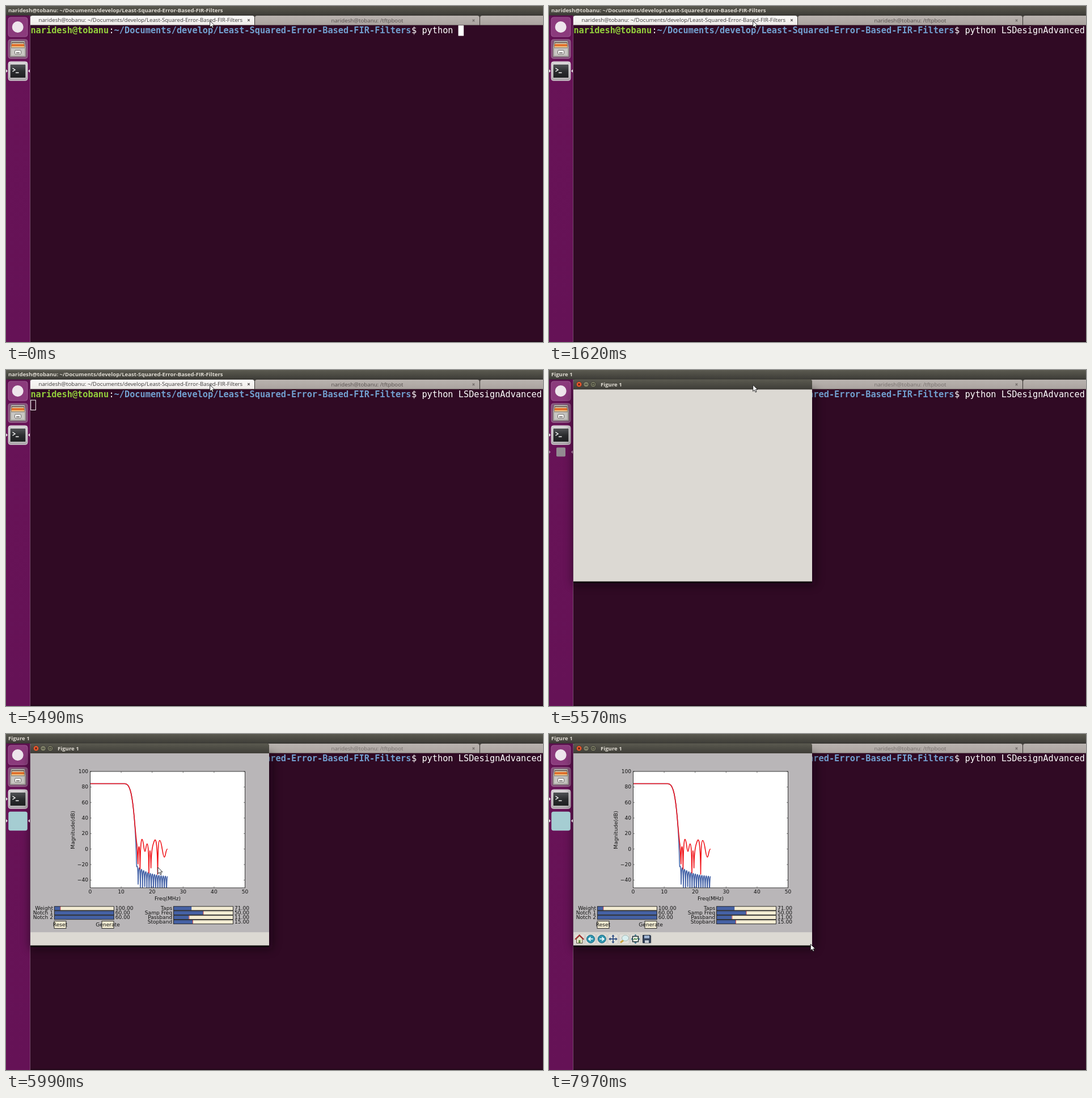
An HTML page that plays this animation: 947x592 px, repeating every 8 s.

```html
<!DOCTYPE html>
<html lang="en">
<head>
<meta charset="utf-8">
<title>Terminal and filter plot</title>
<style>
html, body { margin: 0; width: 100%; height: 100%; overflow: hidden; background: #300a24; }
svg { display: block; width: 947px; height: 592px; }
text { white-space: pre; }
.ui { font: 9.72px "Open Sans", "Noto Sans", sans-serif; }
.bold { font-weight: 700; font-size: 9.6px; fill: #dfdbd2; }
.mono { font: 15.28px "DejaVu Sans Mono", monospace; fill: #fff; }
.plot { font: 9.1px "DejaVu Sans", sans-serif; fill: #111; }
.mid { text-anchor: middle; }
.end { text-anchor: end; }
</style>
</head>
<body>
<svg id="stage" viewBox="0 0 947 592">
  <defs>
    <linearGradient id="bar" x2="0" y2="1"><stop stop-color="#5b5a50"/><stop offset="1" stop-color="#3d3c37"/></linearGradient>
    <linearGradient id="dock" x2="0" y2="1"><stop stop-color="#5c104e"/><stop offset=".12" stop-color="#681357"/><stop offset="1" stop-color="#651256"/></linearGradient>
    <linearGradient id="tabOn" x2="0" y2="1"><stop stop-color="#fbfaf9"/><stop offset="1" stop-color="#eeebe8"/></linearGradient>
    <linearGradient id="tabOff" x2="0" y2="1"><stop stop-color="#b9b3af"/><stop offset="1" stop-color="#aaa39f"/></linearGradient>
    <linearGradient id="tile" x2="0" y2="1"><stop stop-color="#d6d2d5"/><stop offset="1" stop-color="#a9a3a8"/></linearGradient>
    <linearGradient id="screen" x2="0" y2="1"><stop stop-color="#55575a"/><stop offset=".5" stop-color="#2c2e30"/><stop offset="1" stop-color="#1c1d1f"/></linearGradient>
    <filter id="blur" x="-20%" y="-20%" width="140%" height="140%"><feGaussianBlur stdDeviation="8"/></filter>
    <clipPath id="axesClip"><rect x="148.5" y="66" width="273" height="205"/></clipPath>
    <clipPath id="belowBar"><rect y="17" width="947" height="575"/></clipPath>
  </defs>

  <rect width="947" height="592" fill="#300a24"/>
  <rect y="590" width="947" height="2" fill="#220719"/>

  <g id="tabs" class="ui">
    <rect x="43" y="16" width="904" height="17.7" fill="#4a4742"/>
    <path d="M439 33.5V21Q439 17 443 17H831Q835 17 835 21V33.5Z" fill="url(#tabOff)"/>
    <path d="M836 33.5V21Q836 17 840 17H947V33.5Z" fill="url(#tabOff)"/>
    <path d="M43 33.5V20Q43 17 47 17H434Q438 17 438 21V33.5Z" fill="url(#tabOn)"/>
    <path d="M438.5 21V33.5M835.5 19V33.5" stroke="#35302e"/>
    <text id="tabText" x="57.5" y="28.3" fill="#3c3a3a"></text>
    <text id="tabText2" class="mid" x="637" y="28.6"></text>
    <path d="M426.2 23.2l3.6 3.6m0-3.6l-3.6 3.6" stroke="#4a4646" stroke-width="1.1"/>
    <path d="M822.7 23.7l3.6 3.6m0-3.6l-3.6 3.6" stroke="#6b6562" stroke-width="1.1"/>
  </g>

  <g id="prompt" class="mono"></g>
  <rect id="caret"/>

  <g id="dockBar">
    <rect y="16" width="42" height="576" fill="url(#dock)"/>
    <path d="M42.5 16V592" stroke="#76486c"/>
    <rect x="4" y="20" width="34" height="34" rx="4" fill="#8b3a7c" stroke="#a2659a" stroke-width=".8"/>
    <circle cx="20.7" cy="37" r="10" fill="#eee5ec"/>
    <rect x="4" y="59" width="34" height="33.5" rx="4" fill="#85507b" stroke="#a27b9b" stroke-width=".8"/>
    <path d="M9 61.5H33L35 73V88Q35 89.5 33.5 89.5H8.5Q7 89.5 7 88V73Z" fill="#b4b1ad" stroke="#6d6766" stroke-width=".7"/>
    <path d="M10 64H32L33 73.5H9Z" fill="#5a4438"/>
    <path d="M10.5 65.5H31.5V69H10.5Z" fill="#efe3c4"/>
    <path d="M10 67H32V71H10Z" fill="#e0702c"/>
    <path d="M9.5 71H32.5V73H9.5Z" fill="#f0c98a"/>
    <rect x="8.5" y="74" width="25" height="14" rx="1" fill="#c8c6c2" stroke="#8a8683" stroke-width=".6"/>
    <rect x="15.5" y="78" width="11" height="7" rx="1.5" fill="#f4f3f1" stroke="#6c6867"/>
    <path d="M18 82.5H24" stroke="#55504f" stroke-width="1.4"/>
    <rect x="4" y="98" width="34" height="33.5" rx="4" fill="url(#tile)" stroke="#e2dfe1" stroke-width=".8"/>
    <rect x="7" y="102.5" width="28" height="24.5" rx="1.5" fill="url(#screen)" stroke="#f0efee"/>
    <path d="M11.5 109.5L16 112.5L11.5 115.5M17 117.5H22.5" fill="none" stroke="#fff" stroke-width="1.4"/>
    <path d="M0 111.5L3 114.5L0 117.5Z" fill="#e6dce4"/>
    <path id="termFocus" d="M42 111.5L39 114.5L42 117.5Z" fill="#e6dce4"/>
  </g>

  <g id="shadow" clip-path="url(#belowBar)">
    <rect x="42" y="34" width="428" height="345" rx="6" fill="#0c0209" opacity=".5" filter="url(#blur)"/>
  </g>
  <g id="appIcon">
    <rect id="appTile"/>
    <g id="appMarks" fill="#e6dce4"><path d="M0 150L3 153L0 156Z"/><path d="M42 150L39 153L42 156Z"/></g>
  </g>

  <rect width="947" height="16.5" fill="url(#bar)"/>
  <path d="M0 16H947" stroke="#33322e" stroke-width=".8"/>
  <text id="barText" class="ui bold" x="4" y="11"></text>

  <g id="window">
    <rect x="43" y="20" width="421" height="355.5" fill="#100a0d"/>
    <path d="M43 34.5V20Q43 16.5 47 16.5H460Q464 16.5 464 20V34.5Z" fill="url(#bar)"/>
    <rect x="43" y="34.3" width="421" height="338.2" fill="#dcd9d3"/>
    <circle cx="53" cy="25.3" r="4.8" fill="#ec5a30" stroke="#37332d" stroke-width=".8"/>
    <path d="M51.3 23.6l3.4 3.4m0-3.4l-3.4 3.4" stroke="#4b1e10" stroke-width="1.2"/>
    <g fill="#7f8068" stroke="#34332e" stroke-width=".8"><circle cx="65.5" cy="25.3" r="4.8"/><circle cx="78" cy="25.3" r="4.8"/></g>
    <path d="M63.2 25.3H67.8M76 23.6H80V27H76Z" fill="none" stroke="#35352c" stroke-width="1.1"/>
    <text class="ui bold" x="91" y="29">Figure 1</text>
    <g id="figure" class="plot">
      <rect x="43" y="34.3" width="421" height="315" fill="#b9b6b8"/>
      <rect x="148.5" y="66" width="273" height="205" fill="#fff"/>
      <g clip-path="url(#axesClip)" fill="none" stroke-linejoin="round">
        <path id="blueLine" stroke="#4361a6" stroke-width="1.6"/>
        <path id="redLine" stroke="#f01218" stroke-width="1.6"/>
      </g>
      <rect x="148.5" y="66" width="273" height="205" fill="none" stroke="#1c1c1c" stroke-width=".85"/>
    </g>
    <g id="tools" fill="none"></g>
  </g>

  <path id="mouse" d="M0 0V11.2L2.6 8.8L4.4 12.8L6.3 12L4.6 8.1H8.2Z" stroke-width=".9" fill="#fff" stroke="#151515"/>
</svg>
<script>
const $ = id => document.getElementById(id);
const LOOP = 8000, CELL = 9.2, ROW = 18.4, LEFT = 43.4, TOP = 34.2;
const user = 'naridesh@tobanu';
const dir = '~/Documents/develop/Least-Squared-Error-Based-FIR-Filters';
const title = `${user}: ${dir}`;

function add(parent, tag, attrs, text) {
  const el = document.createElementNS('http://www.w3.org/2000/svg', tag);
  for (const k in attrs) el.setAttribute(k, attrs[k]);
  if (text !== undefined) el.textContent = text;
  parent.appendChild(el);
  return el;
}
function set(el, attrs) { for (const k in attrs) el.setAttribute(k, attrs[k]); }
function show(el, on) { el.style.display = on ? '' : 'none'; }
const col = i => LEFT + i * CELL;

// Terminal line
function segment(at, text, fill, weight) {
  return add($('prompt'), 'text', { x: col(at), y: 48.4, fill, 'font-weight': weight }, text);
}
segment(0, user, '#93cf3c', 700);
segment(15, ':', '#fff', 400);
segment(16, dir, '#729fcf', 700);
segment(73, '$ python', '#fff', 400);
const typed = segment(82, '', '#fff', 400);
$('tabText').textContent = title;
$('tabText2').textContent = `${user}: /tftpboot`;

// Axes: 0..50 MHz across, -50..100 dB up
const fig = $('figure');
const px = f => 148.5 + f * 5.46, py = db => 202.7 - db * 1.3667;
function label(x, y, text, cls = '') { return add(fig, 'text', { x, y, class: cls }, text); }
let ticks = '';
for (let f = 0; f <= 50; f += 10) {
  label(px(f), 280.5, f, 'mid');
  ticks += `M${px(f)} 66v2.5M${px(f)} 271v-2.5`;
}
for (let db = -40; db <= 100; db += 20) {
  label(145, py(db) + 3, String(db).replace('-', '\u2212'), 'end');
  ticks += `M148.5 ${py(db)}h2.5M421.5 ${py(db)}h-2.5`;
}
add(fig, 'path', { d: ticks, stroke: '#222', 'stroke-width': .6 });
label(285, 293, 'Freq(MHz)', 'mid');
set(label(0, 0, 'Magnitude(dB)', 'mid'), { transform: 'translate(121 169) rotate(-90)' });

// Responses: shared pass band, then ripples; side lobes are sampling rate / taps apart
const slope = 'M148.5 87.5H209.5C217.5 87.5 221.5 101 225 135C227.5 160 ';
const nyquist = px(25), lobe = px(50 / 71) - px(0);
let lobes = slope + '228.5 175 229.5 205L230.2 228';
for (let x = 230.5; x <= nyquist; x += .25) {
  const top = 252.5 - 21 * Math.exp((230 - x) / 22);
  const dip = 27.3 * Math.log10(Math.abs(Math.cos(Math.PI * (x - nyquist) / lobe)) + 1e-3);
  lobes += `L${x} ${(top - dip).toFixed(1)}`;
}
set($('blueLine'), { d: lobes });
set($('redLine'), { d: slope + `229 183 231 196L232.8 229C233.2 200 234 197 234.8 199
  C235.6 201 236 215 236.4 238C236.8 205 238 185 240 185.5C242.5 186 243 207 245 207
  C246.5 207 247 193.5 248.8 193.5C251 194 251.6 210 252 245C252.4 215 253 205.5 253.8 205.5
  C254.8 206 255.2 215 255.6 236C256.2 195 260 194 261.5 188.5C263 185.5 266.8 178 267.5 247
  C268 200 269 187.5 271 187.5C275 188 276 217 279.3 217C281.5 217 281.5 203 284.8 202.5` });

// Sliders and buttons
function slider(x, y, name, value, fill, mark) {
  add(fig, 'rect', { x, y, width: 105, height: 7, fill: '#f3ecd2' });
  add(fig, 'rect', { x, y, width: fill, height: 7, fill: '#4561a4' });
  if (mark) add(fig, 'path', { d: `M${x + mark} ${y}v7`, stroke: '#e03030', 'stroke-width': .8 });
  add(fig, 'rect', { x, y, width: 105, height: 7, fill: 'none', stroke: '#1a1a1a', 'stroke-width': .9 });
  label(x - 2.3, y + 6.5, name, 'end');
  label(x + 107.5, y + 6.5, value);
}
const row = i => 303.8 + i * 7.95;
slider(85.3, row(0), 'Weight', '100.00', 10.6, 10.6);
slider(85.3, row(1), 'Notch 1', '60.00', 105);
slider(85.3, row(2), 'Notch 2', '60.00', 105);
slider(295.5, row(0), 'Taps', '71.00', 31.7);
slider(295.5, row(1), 'Samp Freq', '50.00', 52.5, 52.5);
slider(295.5, row(2), 'Passband', '11.00', 27, 27.5);
slider(295.5, row(3), 'Stopband', '15.00', 33.5, 34);
function button(x, name) {
  add(fig, 'rect', { x, y: 329.7, width: 21, height: 12.8, fill: '#f3ecd2', stroke: '#1a1a1a', 'stroke-width': .9 });
  label(x + 10.5, 338.8, name, 'mid');
}
button(85, 'Reset');
button(169, 'Generate');

// Toolbar
const tools = $('tools');
for (let i = 0; i < 7; i++)
  add(tools, 'rect', { x: 44.8 + i * 19.75, y: 352.2, width: 17.6, height: 18, rx: 2, fill: '#e1dfda', stroke: '#c5c2bc', 'stroke-width': .8 });
function icon(d, fill, stroke = 'none', width = 1) {
  add(tools, 'path', { d, fill, stroke, 'stroke-width': width });
}
icon('M48.5 361V368.5H59V361L53.7 356Z', '#e8e5c8', '#55513f');
icon('M46 362L53.7 354.3L61.4 362', 'none', '#a52a2a', 1.9);
icon('M52.2 368V363.2H55.4V368Z', '#5a8a3c');
for (const [x, side] of [[73.5, -1], [93.3, 1]]) {
  add(tools, 'circle', { cx: x, cy: 361.2, r: 7, fill: '#2f95ad', stroke: '#1c6580' });
  icon(`M${x - 4 * side} 361.2H${x + 3 * side}M${x} 358L${x + 3.6 * side} 361.2L${x} 364.4`, 'none', '#eefafc', 1.7);
}
icon('M106.5 361.2H119.5M113 354.7V367.7', 'none', '#2b4a80', 1.7);
icon('M105.3 361.2l3.2-2.7v5.4ZM120.7 361.2l-3.2-2.7v5.4ZM113 353.5l-2.7 3.2h5.4ZM113 368.9l-2.7-3.2h5.4Z', '#2b4a80');
icon('M126 367.5L131.5 363.3', 'none', '#c9a13c', 3);
add(tools, 'ellipse', { cx: 134.6, cy: 359.6, rx: 6, ry: 5, fill: '#d9eff0', stroke: '#9fb5b0' });
icon('M147.5 356.5H157.5V366H147.5Z', '#f4f4ee', '#1d2e36', 1.4);
icon('M149 363l2.5-3 2 2.4 3-3.4', 'none', '#4b8b4a', 1.2);
icon('M152.5 352.8l-2.5 2.6h5ZM152.5 369.7l-2.5-2.6h5ZM144.6 361.2l2.4-2.5v5ZM160.4 361.2l-2.4-2.5v5Z', '#35708a');
icon('M165.5 354.5H178.5L179.3 355.5V368H165.5Z', '#34435c', '#1f2938');
icon('M168 355H177V360H168Z', '#9fb4d2');
icon('M169 363.5H176V368H169Z', '#c9ced6');

// Timed states, each held until the next
const typing = [[0, 0], [310, 1], [470, 2], [650, 3], [1540, 4], [1620, 16]];
const path = [
  [0, 359.7, 26.3], [5700, 355, 42], [5850, 310, 140], [5990, 267.8, 235],
  [6120, 345, 305], [6240, 438, 352], [6360, 274.5, 57.5],
  [6500, 276, 46], [6570, 278, 34], [6640, 280.3, 23.5]
];
function held(list, t) {
  let now = list[0];
  for (const item of list) if (t >= item[0]) now = item;
  return now;
}
// The last sweep dips below its end point before settling
function pointer(t) {
  const [, x, y] = held(path, t);
  if (t < 7470) return [x, y];
  const u = Math.min(9, Math.floor((t - 7470) / 62.5) + 1) / 9;
  const e = u * u * (3 - 2 * u);
  return [x + (461.3 - x) * e, y + (370.3 - y) * e + 240 * u ** 4 * (1 - u)];
}

function drawCaret(t, count) {
  const below = t >= 4300, hollow = t >= 5490;
  const on = t < 1200 || (t >= 1540 && t < 1620) || (t >= 4300 && t < 4930) || hollow;
  const inset = hollow ? .5 : 0;
  show($('caret'), on);
  set($('caret'), {
    x: (below ? col(0) : col(82 + count)) - .2 + inset, y: TOP + (below ? ROW : 0) + inset,
    width: 9.6 - 2 * inset, height: ROW - 2 * inset,
    fill: hollow ? 'none' : '#fff', stroke: hollow ? '#fff' : 'none'
  });
}

function render(t) {
  const count = held(typing, t)[1], open = t >= 5570;
  typed.textContent = 'LSDesignAdvanced'.slice(0, count);
  drawCaret(t, count);

  $('barText').textContent = open ? 'Figure 1' : title;
  set($('tabText2'), { fill: open ? '#77706d' : '#57504e' });
  for (const id of ['window', 'shadow', 'appIcon']) show($(id), open);
  show($('termFocus'), !open);
  show(fig, t >= 5850);
  show(tools, t >= 6120);

  const size = t < 5700 ? 16 : t < 5850 ? 26 : 33.5;
  set($('appTile'), {
    x: 21 - size / 2, y: (size < 20 ? 144.5 : 153.5) - size / 2, width: size, height: size,
    rx: size / 9, fill: size < 20 ? '#938a91' : '#a5cdd2'
  });
  set($('appMarks'), { transform: size < 20 ? 'translate(0 -8.5)' : '', opacity: size < 20 ? .5 : 1 });

  const [x, y] = pointer(t);
  set($('mouse'), { transform: `translate(${x.toFixed(1)} ${y.toFixed(1)})` });
}

const start = performance.now();
function tick() {
  render((performance.now() - start) % LOOP);
  requestAnimationFrame(tick);
}
render(0);
requestAnimationFrame(tick);
</script>
</body>
</html>
```
